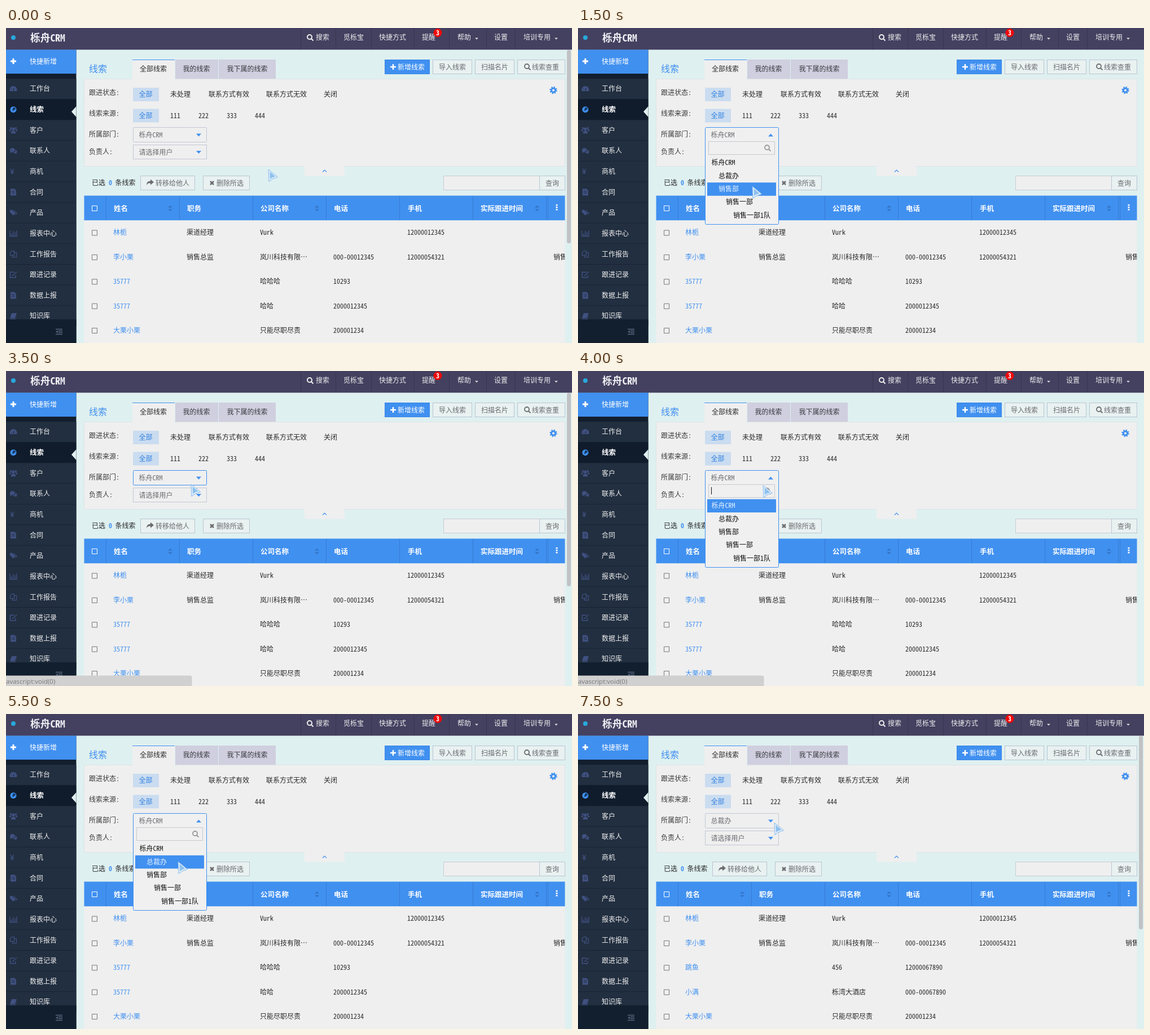
An HTML page for the animation above (8000 ms loop, 1003 px wide and 559 px high).

```html
<!DOCTYPE html>
<html lang="zh-CN">
<head>
<meta charset="utf-8">
<style>
html, body { margin: 0; width: 100%; height: 100%; overflow: hidden; background: #dff0f0; }
svg { display: block; width: 1003px; height: 559px; }
text { font-family: "Noto Sans Mono CJK SC", "Noto Sans CJK SC", "Noto Sans CJK", monospace; white-space: pre; }
.status { font-family: "Open Sans", sans-serif; }
</style>
</head>
<body>
<svg id="stage" viewBox="0 0 1003 559">
  <defs><clipPath id="table"><rect x="138" y="298" width="852.5" height="261"/></clipPath></defs>
  <g id="base"></g>
  <g id="live"></g>
</svg>
<script>
const BLUE = '#4090f0', INK = '#2a2a2a', GREY = '#6b6b70', PANEL = '#efefef', EDGE = '#b9c5d3', DIM = '#405080';
const NIGHT = '#121f2e', ITEM = '#222f40';
const BRAND = '栎舟CRM';

// Drawing helpers; text is placed by its vertical centre
const text = (x, cy, s, fill = INK, size = 12, extra = '') =>
  `<text x="${x}" y="${cy + size * 0.37}" font-size="${size}" fill="${fill}" ${extra}>${s}</text>`;
const bold = (x, cy, s, fill, size = 12) => text(x, cy, s, fill, size, 'font-weight="700"');
const box = (x, y, r, b, fill, stroke, rx = 0) => stroke
  ? `<rect x="${x + .5}" y="${y + .5}" width="${r - x - 1}" height="${b - y - 1}" rx="${rx}" fill="${fill}" stroke="${stroke}"/>`
  : `<rect x="${x}" y="${y}" width="${r - x}" height="${b - y}" rx="${rx}" fill="${fill}"/>`;
const fillPath = (x, y, d, fill, extra = '') =>
  `<path transform="translate(${x} ${y})" d="${d}" fill="${fill}" fill-rule="evenodd" ${extra}/>`;
const linePath = (x, y, d, stroke, w = 1) =>
  `<path transform="translate(${x} ${y})" d="${d}" fill="none" stroke="${stroke}" stroke-width="${w}"/>`;
const disc = (x, y, r, fill) => `<circle cx="${x}" cy="${y}" r="${r}" fill="${fill}"/>`;
const lens = (x, y, c, w = 2) => linePath(x, y, 'M3 -1A4 4 0 1 1 -5 -1A4 4 0 1 1 3 -1M2 2L5.500 5.500', c, w);
const plus = (x, y, w) => linePath(x, y, 'M-5 0H5M0 -5V5', '#fff', w);
const caretDown = (x, y, c = BLUE) => fillPath(x, y, 'M-4.500 -2.500H4.500L0 2.500Z', c);
const caretUp = (x, y, c = BLUE) => fillPath(x, y, 'M-4.500 2.500H4.500L0 -2.500Z', c);
const checkbox = (cy, c) => linePath(157, cy, 'M-4.500 -4.500H4.500V4.500H-4.500Z', c);

const icons = {
  gauge: (x, y, c) => fillPath(x, y, 'M-6 4A6.500 6.500 0 1 1 6 4ZM-1 2L2 -3L1 3ZM-4 0V1H-3V0Z', c),
  globe: (x, y, c) => disc(x, y, 5.5, c) + fillPath(x, y, 'M0 -4L4 -3L3 1L1 0L0 3L-2 1Z', '#14365f'),
  users: (x, y, c) => disc(x, y - 2, 2.7, c) + disc(x - 4.5, y - 3.5, 1.8, c) + disc(x + 4.5, y - 3.5, 1.8, c) +
    fillPath(x, y, 'M-4 6V3Q0 -1 4 3V6ZM-7 2V-1H-3L-5 2ZM7 2V-1H3L5 2Z', c),
  chat: (x, y, c) => fillPath(x, y, 'M-6 -1A4.500 3.500 0 1 1 -2 2L-5 4ZM4 -2Q9 2 5 4L6 6L2 4Q-1 4 -2 3Q4 3 4 -2Z', c),
  yen: (x, y, c) => linePath(x - 2, y, 'M-3 -5L0 0L3 -5M0 0V5M-3 0H3M-3 2.500H3', c, 1.3),
  doc: (x, y, c) => fillPath(x, y, 'M-5 -6H2L5 -3V6H-5ZM-3 -2V-1H3V-2ZM-3 1V2H3V1Z', c),
  tags: (x, y, c) => fillPath(x, y, 'M-6 -5H-2L4 1L0 5L-6 -1ZM0 -5H1L7 1L3 5L5 1Z', c),
  chart: (x, y, c) => linePath(x, y, 'M-6 -5V5H7M-3 4V0M0 4V-4M3 4V-2M6 4V-5', c, 1.4),
  copy: (x, y, c) => linePath(x, y, 'M-5.500 -2.500L-2.500 -5.500H1.500V2.500H-5.500ZM1.500 -2.500H5.500V5.500H-1.500V2.500', c, 1.2),
  edit: (x, y, c) => linePath(x, y, 'M4 1V5H-5.500V-4.500H2M-2 2L6 -5', c, 1.5),
  book: (x, y, c) => fillPath(x, y, 'M-3 -5H6L3 4H-6ZM-6 5H4L6 -1V0L4 6H-6Z', c)
};

function header() {
  const items = [[549, '搜索', 522], [598, '觅栎宝', 584], [661, '快捷方式', 647], [737, '提醒', 723],
    [800, '帮助', 785], [865, '设置', 851], [917, '培训专用', 902]];
  const small = x => fillPath(x, 19, 'M-3 -1.500H3L0 1.500Z', '#ddd');
  return box(0, 0, 1003, 38.5, '#444060') +
    disc(13, 17, 4, '#28a8dc') + bold(43, 17, BRAND, '#f0f0f4', 17.7) +
    items.map(([x, s, line]) => box(line, 0, line + 1, 38, '#383550') + text(x, 17, s, '#eee')).join('') +
    lens(539, 17, '#eee') + small(834) + small(975) +
    disc(765, 8.5, 7.5, '#f00808') + bold(762, 8.5, '3', '#fff');
}

function sidebar() {
  const items = [['工作台', 'gauge'], ['线索', 'globe'], ['客户', 'users'], ['联系人', 'chat'], ['商机', 'yen'],
    ['合同', 'doc'], ['产品', 'tags'], ['报表中心', 'chart'], ['工作报告', 'copy'], ['跟进记录', 'edit'],
    ['数据上报', 'doc'], ['知识库', 'book']];
  let s = box(0, 38.5, 124.5, 559, NIGHT) + box(0, 38.5, 124.5, 81, BLUE) + plus(13, 59, 3) + text(42, 60, '快捷新增', '#fff');
  items.forEach(([name, icon], i) => {
    const cy = 108 + i * 36.64, top = cy - 18, on = i === 1;
    s += box(0, top, 124.5, top + 36, on ? '#101c2c' : ITEM);
    s += icons[icon](13, cy, on ? BLUE : DIM);
    s += on ? bold(42, cy, name, '#fff', 12.5) : text(42, cy, name, '#f0f0f0');
  });
  return s + fillPath(124.5, 148.5, 'M0 -9.500L-8.500 0L0 9.500Z', '#dff0f0') + box(0, 517, 124.5, 559, NIGHT) +
    linePath(94, 539, 'M-6 -4.500H6M-1 -1.500H6M-1 1.500H6M-6 4.500H6', '#56657e', 1.4) +
    fillPath(94, 539, 'M-6 0L-2 -2.500V2.500Z', '#56657e');
}

function button(x, r, tx, label, y = 56) {
  return box(x, y, r, y + 26, '#e9f1f1', EDGE) + text(tx, y + 13.5, label, GREY);
}

function filters() {
  const chip = cy => box(225, cy - 12, 271, cy + 12, '#cadcf0') + text(235.5, cy, '全部', '#3080e0');
  const gear = `<circle cx="970" cy="110.5" r="3.6" fill="none" stroke="${BLUE}" stroke-width="3"/>` +
    `<circle cx="970" cy="110.5" r="5.6" fill="none" stroke="${BLUE}" stroke-width="2.2" stroke-dasharray="2.2 2.2"/>`;
  return text(147, 72, '线索', BLUE, 16) +
    box(138, 90, 991, 246, PANEL, '#dde3e6') +
    box(224, 56, 299, 92, PANEL) + box(224, 56, 299, 57, BLUE) + text(237, 73, '全部线索') +
    box(300, 56, 376, 90, '#cfcfdf') + text(313.5, 73, '我的线索', '#3a3a40') +
    box(377, 56, 478, 90, '#cfcfdf') + text(391.5, 73, '我下属的线索', '#3a3a40') +
    box(671, 56, 751, 82, BLUE, '#3a88e6') + plus(686, 69, 2.5) + text(694, 69.5, '新增线索', '#fff') +
    button(756, 826, 767, '导入线索') + button(831, 901, 842, '扫描名片') + button(906, 991, 932, '线索查重') +
    lens(924, 69, GREY, 1.8) + gear +
    [['跟进状态:', 115], ['线索来源:', 152], ['所属部门:', 189], ['负责人:', 220]].map(([s, y]) => text(147, y, s, '#3a3a3a')).join('') +
    chip(118) + chip(155.5) +
    [[291, '未处理'], [359, '联系方式有效'], [461, '联系方式无效'], [563, '关闭']].map(([x, s]) => text(x, 118, s)).join('') +
    [1, 2, 3, 4].map(n => text(241 + n * 50, 156, String(n).repeat(3))).join('') +
    box(225, 207, 356, 233, PANEL, '#c3c8d6') + text(235.5, 221, '请选择用户', GREY) + caretDown(341.5, 220.5) +
    box(529, 244, 600, 262.5, PANEL) + linePath(564.5, 253.5, 'M-3.500 2L0 -1.500L3.500 2', BLUE, 1.2);
}

function toolbarAndHead() {
  const cols = [[191, '姓名'], [321, '职务'], [451, '公司名称'], [581, '电话'], [712, '手机'], [841, '实际跟进时间']];
  return text(152, 275, '已选') + bold(182, 275, '0', BLUE) + text(193.5, 275, '条线索') +
    box(775, 262, 946, 288, PANEL, '#c6cbd8') + button(945, 991, 956, '查询', 262) +
    box(138.5, 297.5, 990.5, 341.5, BLUE) +
    [177, 307, 437, 567, 697, 827, 957, 960].map(x => box(x, 298, x + 1, 341, '#357cd2')).join('') +
    cols.map(([x, s]) => bold(x, 320, s, '#fff', 12.5)).join('') + checkbox(320, '#fff') +
    [291, 551, 941].map(x => fillPath(x, 320, 'M-4 -1.500L0 -5L4 -1.500ZM-4 1.500L0 5L4 1.500Z', '#3373c2')).join('') +
    [-4, 0, 4].map(d => box(974.5, 317 + d, 977.5, 319.5 + d, '#fff')).join('');
}

function rows(updated) {
  const people = [
    ['林栀', '渠道经理', 'Vurk', '', '12000012345'],
    ['李小栗', '销售总监', '岚川科技有限…', '000-00012345', '12000054321', '销售部'],
    ...(updated
      ? [['跳鱼', '', '456', '12000067890'], ['小满', '', '栎湾大酒店', '000-00067890']]
      : [['35777', '', '哈哈哈', '10293'], ['35777', '', '哈哈', '2000012345']]),
    ['大栗小栗', '', '只能尽职尽责', '200001234']
  ];
  const xs = [190, 320, 450, 580, 711, 970];
  return box(138.5, 341.5, 990.5, 559, PANEL) + '<g clip-path="url(#table)">' + people.map((p, i) => {
    const cy = 363 + i * 43.4;
    return checkbox(cy + .5, '#777') + p.map((s, k) => text(xs[k], cy, s, k ? INK : BLUE)).join('');
  }).join('') + '</g>';
}

function loading(turn) {
  let s = box(138.5, 341.5, 990.5, 511, PANEL) + box(138, 470, 991, 471, '#d9dde2') + box(138, 510, 991, 512, '#d4d8ea');
  for (let i = 0; i < 8; i++) {
    const a = i * Math.PI / 4, g = 60 + ((i + turn) % 8) * 15;
    s += disc(533 + 5 * Math.cos(a), 404 + 5 * Math.sin(a), 1.2, `rgb(${g},${g},${g})`);
  }
  s += text(546, 404, '正在加载', '#333', 14) + text(364, 487, '第 1-10 条 共 12 条') +
    box(489, 474, 620, 500, PANEL, '#c3c8d6') + text(512, 488, '每页显示10条') + caretDown(610, 488);
  ['1', '2'].forEach((c, i) => {
    s += box(625 + i * 24, 474, 650 + i * 24, 500, i ? PANEL : '#dadae0', '#c9cdd8') + text(634.5 + i * 24, 487.5, c, i ? '#333' : '#888');
  });
  const chevron = 'M-1.500 -3L1.500 0L-1.500 3';
  s += box(673, 474, 698, 500, PANEL, '#c9cdd8') + linePath(685.5, 487.5, chevron, '#444') +
    box(697, 474, 722, 500, PANEL, '#c9cdd8') + linePath(707.5, 487.5, chevron, '#444') + linePath(710.5, 487.5, chevron, '#444');
  return s + text(957, 487, '导出');
}

function actions(hover) {
  const tint = i => hover === i ? '#2a80e0' : GREY;
  const edge = i => hover === i ? '#8cb8e8' : EDGE;
  return box(238, 262, 335, 288, '#e9f1f1', edge(0)) +
    fillPath(255, 274.5, 'M-6 5Q-6 -3 1 -3V-6L7 -1L1 4V1Q-4 0 -6 5Z', tint(0)) + text(265, 275.5, '转移给他人', tint(0)) +
    box(349, 262, 432, 288, '#e9f1f1', edge(1)) +
    linePath(365, 275, 'M-3 -3L3 3M3 -3L-3 3', tint(1), 2.6) + text(373, 275.5, '删除所选', tint(1));
}

function department(value, focus) {
  return box(225, 176, 356, 203, PANEL, focus ? BLUE : '#c3c8d6', 1) + text(235.5, 190, value, GREY) + caretDown(341.5, 190);
}

function dropdown(active, caret) {
  const options = [[236.5, BRAND], [249, '总裁办'], [249, '销售部'], [262, '销售一部'], [275, '销售一部1队']];
  return box(225, 176, 356, 349, '#f0f0f0', BLUE, 2) + text(235.5, 190, BRAND, GREY) + caretUp(341.5, 190) +
    box(231, 201, 349, 225, '#f0f0f0', '#c5c9cf') + lens(336, 213, '#999', 1.8) +
    (caret ? box(236, 206, 237, 219, '#111') : '') +
    options.map(([x, s], i) => {
      const cy = 239 + i * 23.35, on = i === active;
      return (on ? box(229, cy - 11.5, 351, cy + 12, BLUE) : '') + text(x, cy, s, on ? '#e8f2ff' : '#111');
    }).join('');
}

const statusBar = (s, opacity) => `<g opacity="${opacity}">` + box(-4, 540.5, 329.5, 564, '#d0d0d0', '', 3) +
  `<text class="status" x="0" y="555" font-size="11.5" fill="#777">${s}</text></g>`;

const pointer = ([x, y]) =>
  fillPath(x, y, 'M0 0L1 21.500L7 17L16.500 13.500Z', '#e2effa', 'stroke="#86b8ec" stroke-width="1" stroke-linejoin="round"') +
  fillPath(x, y, 'M2.500 4L3 17L6.500 14.500L12.500 12.500Z', '#8cc0ee');

// One pose per half second
const LINK = 'avascript:void(0)', CALL = 'avascript:;';
const poses = [
  { at: [465, 251] },
  { at: [330, 190], status: LINK },
  { at: [318, 216], open: 0, caret: true, status: LINK, fade: .2 },
  { at: [309, 281], open: 2 },
  { at: [320, 339], open: 4 },
  { at: [432, 209], open: 2 },
  { at: [346, 204], focus: true },
  { at: [328, 201], focus: true, status: LINK },
  { at: [328, 203], open: 0, caret: true, status: LINK },
  { at: [309, 280], open: 2 },
  { at: [303, 279], open: 2, caret: true },
  { at: [305, 262], open: 1 },
  { at: [305, 262], chosen: true, focus: true, loading: true, noScroll: true },
  { at: [304, 268], chosen: true, focus: true, loading: true, hover: 0, status: CALL },
  { at: [372, 270], chosen: true, focus: true, hover: 1, status: CALL },
  { at: [348, 193], chosen: true }
];

function draw(step) {
  const p = poses[step], open = p.open !== undefined;
  return (p.loading ? loading(step) : rows(p.chosen)) + actions(p.hover) +
    (open ? dropdown(p.open, p.caret) : department(p.chosen ? '总裁办' : BRAND, p.focus)) +
    (open || p.noScroll ? '' : box(994, 39, 1001, 382, '#c1c2c4', '', 3)) +
    (p.status ? statusBar(p.status, p.fade || 1) : '') + pointer(p.at);
}

document.getElementById('base').innerHTML = box(0, 0, 1003, 559, '#dff0f0') + header() + sidebar() + filters() + toolbarAndHead();
const live = document.getElementById('live');
let shown = -1;
function tick(now) {
  const step = Math.floor((now % 8000) / 500);
  if (step !== shown) live.innerHTML = draw(shown = step);
  requestAnimationFrame(tick);
}
tick(performance.now());
</script>
</body>
</html>
```
